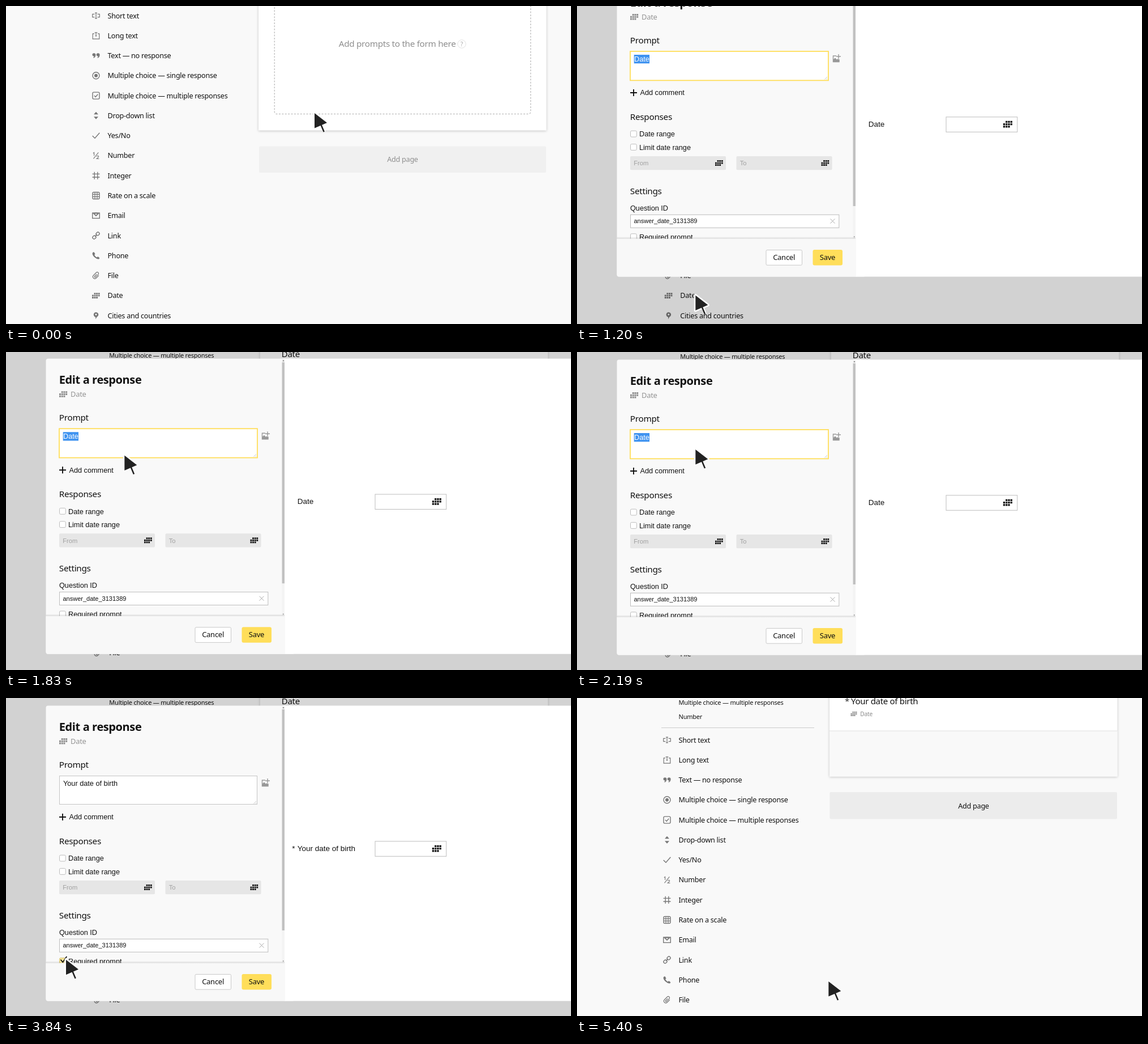
Animation, 998 px wide and 561 px high, one loop 6360 ms. Source, as an HTML page:

```html
<!DOCTYPE html>
<html lang="en">
<head>
<meta charset="utf-8">
<title>Form builder</title>
<style>
  html, body { margin: 0; width: 100%; height: 100%; overflow: hidden; background: #f9f9f9; }
  svg { display: block; width: 100vw; height: 100vh; }
  text { white-space: pre; }
  .ui { font-family: "Noto Sans", "Open Sans", sans-serif; letter-spacing: -.02em; }
  .form { font-family: "Liberation Sans", Arial, sans-serif; }
  .head { font-weight: 500; }
  .title { font-weight: 600; }
  .card { filter: drop-shadow(0 1px 2px rgba(0, 0, 0, .22)); }
  .icon { fill: none; stroke: #777; stroke-width: 1.4; }
  .icon .solid { fill: #777; stroke: none; }
</style>
</head>
<body>
<svg id="stage" viewBox="0 0 998 561" preserveAspectRatio="none"></svg>
<script>
const SCROLL = 57, STEP = 30, LOOP = 6360, MOVE = 900, SCENE = 1200;
const YELLOW = '#ffde5a', INK = '#111';

const label = (cls, x, y, size, str, fill = INK, extra = '') =>
  `<text class="${cls}" x="${x}" y="${y}" font-size="${size}" fill="${fill}" ${extra}>${str}</text>`;
const ui = (...args) => label('ui', ...args);
const head = (...args) => label('ui head', ...args);
const form = (...args) => label('form', ...args);
const box = (x, y, w, h, fill, extra = '') =>
  `<rect x="${x}" y="${y}" width="${w}" height="${h}" fill="${fill}" ${extra}/>`;
const line = (d, color, width = 1, extra = '') =>
  `<path d="${d}" fill="none" stroke="${color}" stroke-width="${width}" ${extra}/>`;
const group = (id, body, extra = '') => `<g id="${id}" ${extra}>${body}</g>`;

// Calendar mark: 4 by 3 square cells without the first and the last
function calendar(x, y, width, fill) {
  const pitch = width / 4, side = pitch * .78;
  let d = '';
  for (let i = 1; i < 11; i++)
    d += `M${x + i % 4 * pitch} ${y + Math.floor(i / 4) * pitch}h${side}v${side}h${-side}z`;
  return `<path d="${d}" fill="${fill}" stroke="none"/>`;
}

// Each icon is centred on 0,0
const items = [
  ['Short text', '<path d="M-2.6-2.6H-6.3V2.6H-2.6M2.6-2.6H6.3V2.6H2.6M-2-4.8H2M0-4.8V4.8M-2 4.8H2" stroke-width="1.2"/>'],
  ['Long text', '<path d="M-3-3.4H-5.8V5.8H5.8V-3.4H3M-2.4-5.4H2.4M0-5.4V.6M-1.4 .6H1.4" stroke-width="1.2"/>'],
  ['Text — no response', [-6.6, .6].map(x =>
    `<path class="solid" d="M${x}-1.3a3 3 0 1 1 6 0q0 4-3.6 5.6l-.8-1q1.6-1 1.7-2.2a3 3 0 0 1-3.3-2.4z"/>`).join('')],
  ['Multiple choice — single response', '<circle r="6"/><circle r="3" class="solid"/>'],
  ['Multiple choice — multiple responses', '<rect x="-6" y="-6" width="12" height="12" rx="2"/><path d="M-3 0L-.8 2.4L3.2-2.4"/>'],
  ['Drop-down list', '<path class="solid" d="M-4-2L0-6.5L4-2ZM-4 2L0 6.5L4 2Z"/>'],
  ['Yes/No', '<path d="M-6.3 .3L-2 4.6L6.3-4.8"/>'],
  ['Number', '<path d="M-5.2-4L-3.4-5.5V0M4.3-5.5L-4.5 5.5M1.2 1.8Q2-.1 3.6 .4T4.2 2.8L1.2 5.6H5.4" stroke-width="1.1"/>'],
  ['Integer', '<path d="M-2.8-6.5V6.5M2.8-6.5V6.5M-6.5-2.8H6.5M-6.5 2.8H6.5"/>'],
  ['Rate on a scale', '<rect x="-6" y="-6" width="12" height="12" rx="2"/><path d="M-2-6V6M2-6V6M-6-2H6M-6 2H6" stroke-width="1.2"/>'],
  ['Email', '<rect x="-6.3" y="-4.6" width="12.6" height="9.4"/><path d="M-5-4.5L0 .4L5-4.5M-3-4.2H3" stroke-width="1.8"/>'],
  ['Link', '<g transform="rotate(-45)"><rect x="-7.4" y="-2.6" width="6.2" height="5.2" rx="2.5"/><rect x="1.2" y="-2.6" width="6.2" height="5.2" rx="2.5"/><path d="M-2.5 0H2.5"/></g>'],
  ['Phone', '<path class="solid" d="M-5.6-5.4L-3.6-6.3L-1.4-2.6L-3-1.2Q-1.4 2 1.6 3.2L3.2 1.8L6.4 4.3L5.2 6.2Q2.6 7-1.6 3.8T-6.4-3Q-6.5-4.6-5.6-5.4Z"/>'],
  ['File', '<path transform="rotate(45)" d="M3.4-3.6V3A3.4 3.4 0 0 1-3.4 3V-4A2.4 2.4 0 0 1 1.4-4V2.6A1.1 1.1 0 0 1-.8 2.6V-2.6" stroke-width="1.2"/>'],
  ['Date', calendar(-7, -4.9, 14.4, '#777')],
  ['Cities and countries', '<path class="solid" fill-rule="evenodd" d="M-.8 6.4V2.6A4.3 4.3 0 1 1 1.6 2.4ZM0-3.2A1.5 1.5 0 1 0 .01-3.2Z"/>']
];

function list() {
  const recent = ui(179.5, -45.3, 11, 'Multiple choice — multiple responses')
    + ui(179.5, -20.2, 11, 'Number') + line('M149-4.5H419', '#ccc');
  return recent + items.map(([name, icon], i) => {
    const y = 17 + i * 35.27;
    return `<g class="icon" transform="translate(159 ${y})">${icon}</g>` + ui(179.5, y + 4.6, 12.6, name);
  }).join('');
}

const emptyCard =
  box(446, -20, 508.5, 239.5, '#fff', 'class="card"')
  + box(474.3, -30, 452.4, 220.6, 'none', 'rx="4" stroke="#c4c4c4" stroke-width="1.5" stroke-dasharray="3 2.4"')
  + ui(587.8, 72.4, 15.25, 'Add prompts to the form here', '#8f8f8f')
  + '<circle cx="805" cy="67" r="7.2" fill="none" stroke="#e2e2e2"/>'
  + ui(805, 70.8, 10.5, '?', '#aaa', 'text-anchor="middle"')
  + box(447, 247.5, 507, 46.5, '#f0f0f0', 'rx="2"')
  + ui(700.5, 275.4, 12.6, 'Add page', '#8f8f8f', 'text-anchor="middle"');

const filledCard =
  box(446, -80, 508.5, 218.5, '#fff', 'class="card"')
  + box(446, 58, 508.5, 80.5, '#f9f9f9') + line('M446 58H954.5', '#e0e0e0')
  + group('star', ui(473, 11, 15, '*', '#333'))
  + group('cardTitle', '')
  + calendar(483.5, 24, 11.6, '#8c8c8c') + ui(500.3, 32, 10.2, 'Date', '#8c8c8c')
  + box(446.5, 166, 507.5, 47.5, '#ececec', 'rx="2"')
  + ui(700.5, 194.7, 12.6, 'Add page', INK, 'text-anchor="middle"');

const checkbox = y => box(94.5, y, 10.8, 10.8, '#fff', 'rx="2" stroke="#bdbdbd"');
const dateField = (x, name) =>
  box(x, 322, 169, 24.3, '#e6e6e6', 'rx="2"') + form(x + 6.2, 338.3, 11.2, name, '#a0a0a0')
  + calendar(x + 150, 329, 14.5, INK);

const editor =
  box(70.5, 13.5, 440, 521, '#f9f9f9', 'rx="4"') + box(492, 13.5, 520, 521, '#fff')
  + label('ui title', 93.8, 57.5, 20, 'Edit a response')
  + calendar(94, 71, 15, '#8c8c8c') + ui(114, 80.9, 12.9, 'Date', '#949494')
  + head(93.8, 122.8, 15.3, 'Prompt')
  + group('idle', box(94.5, 137.5, 349, 50, '#fff', 'stroke="#c4c4c4"'))
  + group('focus', box(94, 137, 350, 51.3, '#fff', `stroke="${YELLOW}" stroke-width="1.8"`))
  + line('M437.5 186.5L442 182M440.5 186.5L442 185', '#bbb', .8)
  + group('picked', box(100.7, 143, 27.3, 15.3, '#3f93f0') + form(101, 155, 12.7, 'Date', '#fff'))
  + group('typed', form(101, 155, 12.7, 'Your date of birth'))
  + line('M458 145H452.5V155.5H463V151', '#999', 1.4)
  + '<path d="M453 155V151L456 148.5L459 151.5L461 150L463 152V155Z" fill="#999"/>'
  + line('M462 142V150M458 146H466', '#999', 1.4)
  + line('M94 210H106M100 204V216', INK, 1.9) + form(111.5, 214.4, 12.7, 'Add comment')
  + head(93.8, 258.2, 15.3, 'Responses')
  + checkbox(277.2) + form(110, 287.3, 12.7, 'Date range')
  + checkbox(300.6) + form(110, 310.8, 12.7, 'Limit date range')
  + dateField(94, 'From') + dateField(281.5, 'To')
  + head(93.8, 389, 15.3, 'Settings')
  + form(94, 418, 12.7, 'Question ID')
  + box(94.5, 425.2, 368.3, 23, '#fff', 'stroke="#bdbdbd"')
  + form(100.5, 440.4, 11, 'answer_date_3131389')
  + line('M447.5 432.5L455.5 440.5M455.5 432.5L447.5 440.5', '#aaa')
  + checkbox(458.8)
  + group('checked', box(94.5, 458.8, 10.8, 10.8, '#ffeb9c', 'rx="2" stroke="#d8c471"')
    + line('M96.5 461.5L100.3 466L107.3 456', INK, 1.8))
  + form(110, 468.6, 12.7, 'Required prompt')
  + box(487, 13.5, 5, 454, '#f4f4f4') + box(487.6, 20, 4.4, 390, '#c1c1c1')
  + '<path d="M488.3 18L490 15.8L491.7 18ZM488.6 463.6H491L489.8 465.2Z" fill="#777"/>'
  + box(70.5, 464, 421.5, 4, 'url(#shade)')
  + '<path d="M70.5 467.5H493V534.5H74.5a4 4 0 0 1-4-4Z" fill="#f8f8f8"/>'
  + box(334, 487.5, 63.5, 26.7, '#fff', 'rx="2" stroke="#c8c8c8"')
  + ui(365.6, 505.2, 13, 'Cancel', INK, 'text-anchor="middle"')
  + box(416.5, 487, 52.5, 27.5, YELLOW, 'rx="3"')
  + ui(442.5, 505.2, 13, 'Save', INK, 'text-anchor="middle"')
  + group('required', form(505.2, 270, 13.5, '*'))
  + group('preview', '')
  + box(652, 252.8, 125.7, 26.5, '#fff', 'stroke="#bdbdbd"')
  + calendar(752.8, 259.8, 17, INK);

const pointer = '<path d="M0 .5V27L22 17.5Z M11.5 19L17 33" fill="#fff" stroke="#fff" stroke-width="5" stroke-linejoin="round"/>'
  + '<path d="M0 .5V27L22 17.5Z" fill="#222"/>' + line('M11 20L16.7 33.5', '#222', 2.6);

const stage = document.getElementById('stage');
stage.innerHTML =
  `<defs><linearGradient id="shade" x1="0" y1="0" x2="0" y2="1">
    <stop offset="0" stop-color="#000" stop-opacity="0"/><stop offset="1" stop-color="#000" stop-opacity=".15"/>
  </linearGradient></defs>`
  + box(0, 0, 998, 561, '#f9f9f9')
  + group('page', list() + group('before', emptyCard)
    + group('after', filledCard, `transform="translate(0 ${-SCROLL})"`))
  + group('dim', box(0, 0, 998, 561, '#000', 'opacity=".155"'))
  + group('modal', editor) + group('cursor', pointer);

const el = id => document.getElementById(id);
const show = (id, on) => el(id).setAttribute('display', on ? 'inline' : 'none');
const move = (id, x, y) => el(id).setAttribute('transform', `translate(${x} ${y})`);
const mix = (a, b, p) => a + (b - a) * p;

// Exponential ease in and out
function ease(x) {
  if (x <= 0) return 0;
  if (x >= 1) return 1;
  return x < .5 ? 2 ** (20 * x - 11) : 1 - 2 ** (9 - 20 * x);
}

// The pointer goes from one stop to the next, one per scene
const stops = [[545, 188.5], [209.3, 510], [209.3, 171.5], [99.2, 460.5], [444.3, 499.5]];

function draw(time) {
  const t = Math.floor((time % LOOP) / STEP) * STEP;
  const scene = Math.min(4, Math.floor(t / SCENE));
  const p = ease((t - scene * SCENE) / MOVE);
  const [a, b] = [stops[scene], stops[Math.min(4, scene + 1)]];
  const editing = scene > 0 && scene < 4;
  const scroll = scene === 0 ? 0 : scene === 1 ? SCROLL * p : SCROLL;

  move('page', editing ? 2.8 : 0, scroll);
  move('modal', 0, scroll - SCROLL);
  move('cursor', mix(a[0], b[0], p), mix(a[1], b[1], p));

  show('before', scene === 0);
  show('after', scene > 0);
  show('dim', editing);
  show('modal', editing);
  show('star', scene === 4);
  show('picked', scene === 1);
  show('typed', scene > 1);
  show('focus', scene < 3);
  show('idle', scene === 3);
  show('checked', scene === 3);
  show('required', scene === 3);
  el('preview').innerHTML = form(514.8, 269.7, 13.5, scene > 1 ? 'Your date of birth' : 'Date');
  el('cardTitle').innerHTML = ui(484, 10.7, 15, scene === 4 ? 'Your date of birth' : 'Date');
}

const start = performance.now();
function tick() {
  draw(performance.now() - start);
  requestAnimationFrame(tick);
}
tick();
</script>
</body>
</html>
```
